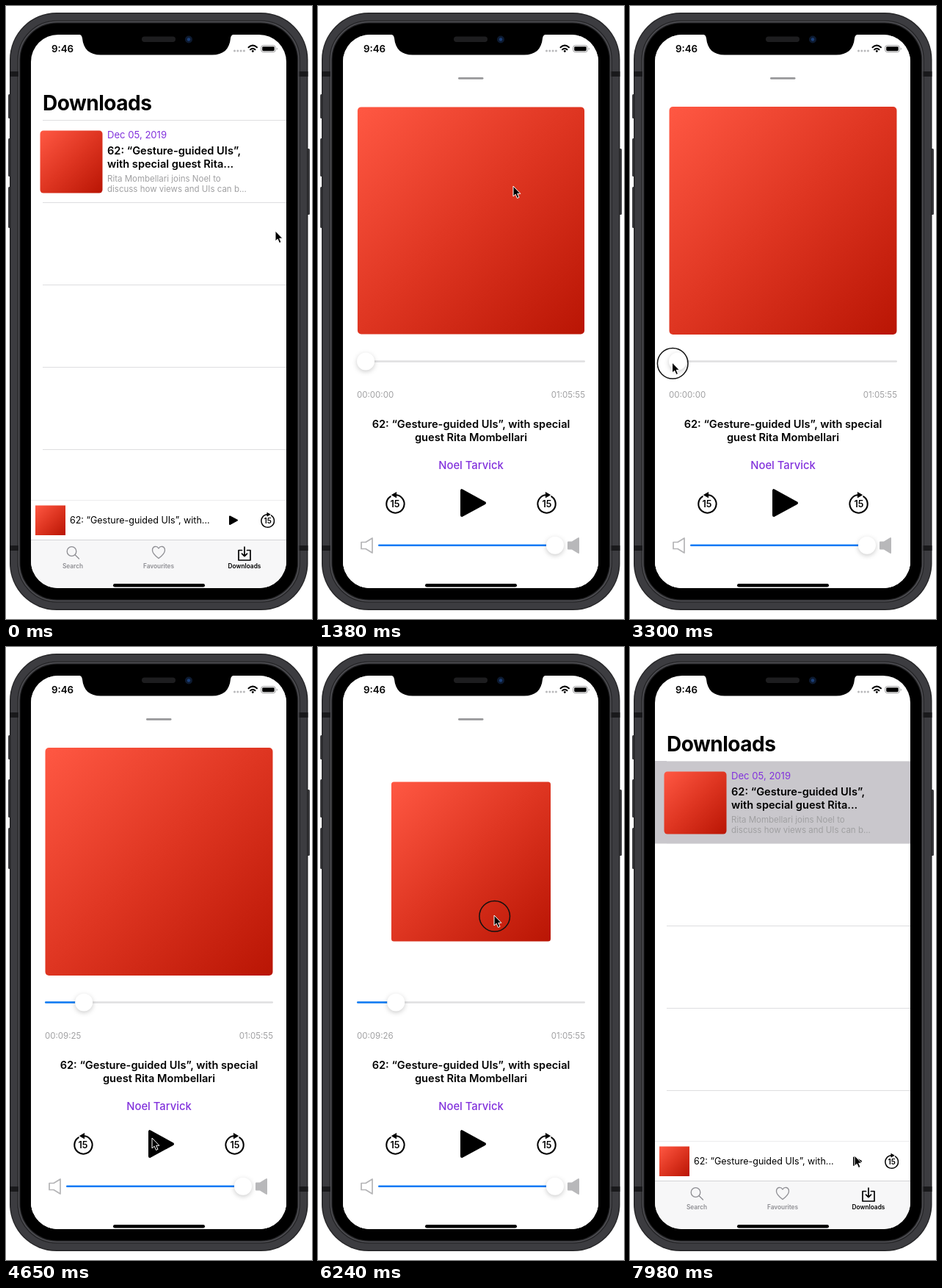
An HTML page that plays this animation: 417x834 px, repeating every 8 s.

```html
<!DOCTYPE html>
<html lang="en">
<head>
<meta charset="utf-8">
<title>Podcast player</title>
<style>
  html, body { margin: 0; width: 100%; height: 100%; overflow: hidden; background: #fff; }
  svg { display: block; width: 100vw; height: 100vh; font-family: Inter, Roboto, sans-serif; }
  .h1 { font-size: 28px; font-weight: 700; letter-spacing: -.5px; }
  .head { font-size: 14.6px; font-weight: 600; }
  .date { font-size: 13.1px; }
  .small { font-size: 11.5px; fill: #a0a0a2; }
  .mini { font-size: 12.5px; }
  .tab { font-size: 8.3px; font-weight: 600; }
  .purple { fill: #8232dc; }
  .mid { text-anchor: middle; }
  .end { text-anchor: end; }
  .line { fill: none; stroke-linecap: round; stroke-linejoin: round; }
  .knob { fill: #fff; filter: drop-shadow(0 2px 3px #0003); }
</style>
</head>
<body>
<svg viewBox="0 0 417 834">
  <defs>
    <linearGradient id="red" x1="0" y1="0" x2="1" y2="1">
      <stop offset="0" stop-color="#ff5843"/><stop offset=".5" stop-color="#de3521"/><stop offset="1" stop-color="#b91504"/>
    </linearGradient>
    <clipPath id="screen"><rect x="34" y="39" width="348" height="753" rx="37"/></clipPath>
    <g id="skip">
      <path class="line" stroke="#000" stroke-width="2" d="M6-9.800A11.700 11.700 0 1 1 0-11.700"/>
      <path d="M-2-15.800 5-11.700-2-7.600Z"/>
    </g>
  </defs>

  <g id="phone">
    <g fill="#38383b">
      <rect x="3" y="120" width="6" height="33" rx="1.500"/>
      <rect x="3" y="180" width="6" height="52" rx="1.500"/>
      <rect x="3" y="246" width="6" height="56" rx="1.500"/>
      <rect x="408" y="194" width="6" height="90" rx="1.500"/>
    </g>
    <rect x="5" y="9" width="406.500" height="813" rx="64" fill="#252527"/>
    <rect x="11" y="15" width="394.500" height="801" rx="58" fill="none" stroke="#3c3c40" stroke-width="9"/>
    <rect x="17.500" y="21.500" width="381.500" height="788" rx="52" fill="none" stroke="#505055" stroke-width="1.500"/>
    <path fill="#19191b" d="M5 89h12v7H5zM399.500 89h12v7h-12zM5 734h12v7H5zM399.500 734h12v7h-12z"/>
    <rect x="19.500" y="23.500" width="377.500" height="784" rx="50"/>
    <rect x="34" y="39" width="348" height="753" rx="37" fill="#fff"/>
  </g>

  <g clip-path="url(#screen)">
    <g id="list">
      <text class="h1" x="50" y="142">Downloads</text>
      <rect id="cell" x="34" y="155" width="348" height="112.500" fill="#c9c7cc"/>
      <path id="rules" stroke="#dedee0"/>
      <rect x="46.500" y="169.500" width="85" height="85" rx="4.500" fill="url(#red)"/>
      <text class="date purple" x="138" y="180">Dec 05, 2019</text>
      <text class="head" x="138" y="202">62: “Gesture-guided UIs”,</text>
      <text class="head" x="138" y="220">with special guest Rita...</text>
      <text class="small" x="138" y="239">Rita Mombellari joins Noel to</text>
      <text class="small" x="138" y="253">discuss how views and UIs can b...</text>

      <path d="M34 672.500H382" stroke="#ececee"/>
      <rect x="40" y="679.500" width="41" height="40.500" fill="url(#red)"/>
      <text class="mini" x="87" y="704">62: “Gesture-guided UIs”, with...</text>
      <path class="line" style="fill:#000" stroke="#000" stroke-width="2" d="M305 694.500V705L315 699.700Z"/>
      <use href="#skip" transform="translate(357 700.500) scale(.75)"/>
      <text class="mid" x="356.800" y="704.400" font-size="10" font-weight="600">15</text>

      <rect x="34" y="726" width="348" height="66" fill="#f7f7f8"/>
      <path d="M34 726.500H382" stroke="#d4d4d6"/>
      <g class="line" stroke="#8e8e93" stroke-width="1.300">
        <circle cx="89.500" cy="742" r="6.300"/><path d="M94.200 746.700 99.500 752"/>
        <path d="M208 751.500C202 747 199.500 744 199.500 740.500C199.500 735 205.500 733.500 208 738C210.500 733.500 216.500 735 216.500 740.500C216.500 744 214 747 208 751.500Z"/>
        <path stroke="#000" stroke-width="1.700" d="M321.500 740.500H317V754H333V740.500H328.500M325 736V748.500M321.500 745.200 325 748.700 328.500 745.200"/>
      </g>
      <g class="tab mid" fill="#8e8e93">
        <text x="91" y="765">Search</text>
        <text x="208" y="765">Favourites</text>
        <text x="325" y="765" fill="#000">Downloads</text>
      </g>
    </g>

    <g id="sheet">
      <rect x="34" y="39" width="348" height="830" fill="#fff"/>
      <rect x="191" y="97" width="34.500" height="2.800" rx="1.400" fill="#98989a"/>
      <rect id="cover" x="-155" y="-155" width="310" height="310" rx="5" fill="url(#red)"/>

      <rect x="53" y="482.300" width="311" height="2.500" rx="1.200" fill="#dfdfe1"/>
      <rect id="played" x="53" y="482.300" height="2.500" rx="1.200" fill="#0a7af5"/>
      <circle id="knob" class="knob" cy="483.500" r="12"/>
      <text id="elapsed" class="small" x="53" y="532.600"></text>
      <text class="small end" x="364" y="532.600">01:05:55</text>

      <g class="mid">
        <text class="head" x="208.500" y="574">62: “Gesture-guided UIs”, with special</text>
        <text class="head" x="208.500" y="592">guest Rita Mombellari</text>
        <text class="purple" x="208.500" y="630" font-size="14.800" font-weight="500">Noel Tarvick</text>
        <g font-size="12.500" font-weight="600">
          <text x="105" y="682">15</text><text x="312" y="682">15</text>
        </g>
      </g>
      <use href="#skip" transform="translate(105 677.500) scale(-1.040 1.040)"/>
      <use href="#skip" transform="translate(312 677.500) scale(1.040)"/>
      <path id="play" class="line" style="fill:#000" stroke="#000" stroke-width="4" d="M196 659.200V693L227 676.200Z"/>
      <path id="pause" d="M196 659h9v35h-9zM215 659h9v35h-9z"/>

      <path class="line" stroke="#b4b4b6" stroke-width="1.700" d="M59 729.500H65L74 724V744L65 738.500H59Z"/>
      <path class="line" style="fill:#b8b8ba" stroke="#b8b8ba" stroke-width="2" d="M341 729.500H346L355 724V744L346 738.500H341Z"/>
      <rect x="82" y="732.500" width="241" height="2.500" rx="1.200" fill="#0a7af5"/>
      <circle class="knob" cx="323" cy="733.700" r="12"/>
    </g>
    <rect x="146" y="786" width="125" height="4.500" rx="2.200"/>
  </g>

  <g id="status">
    <path d="M98 38H312C307.500 39 306.500 41 306 44C304.500 59 296 66.500 281 66.500H129C114 66.500 105.500 59 104 44C103.500 41 102.500 39 98 38Z"/>
    <rect x="185" y="41.500" width="46" height="7.500" rx="3.700" fill="#1d1d1f"/>
    <circle cx="249" cy="45.500" r="5" fill="#0d1a30"/><circle cx="249" cy="45.500" r="2.200" fill="#1b3f78"/>
    <text x="62" y="63" font-size="13.300" font-weight="600">9:46</text>
    <path class="line" stroke="#b9b9bb" stroke-width="3" stroke-dasharray="0 4.300" d="M311.500 61H326"/>
    <path class="line" stroke="#000" stroke-width="2" d="M330.500 56.300Q336.300 51 342 56.300M333 59.300Q336.300 56.500 339.500 59.300"/>
    <circle cx="336.300" cy="61.500" r="1.400"/>
    <rect x="347.700" y="53.700" width="19.500" height="9" rx="2.800" fill="none" stroke="#9a9a9c"/>
    <rect x="349.200" y="55.200" width="16.500" height="6" rx="1.400"/>
    <path d="M368.800 56.500Q371 58.200 368.800 60Z" fill="#9a9a9c"/>
  </g>

  <g id="cursor">
    <circle id="press" cx=".7" cy="1.300" r="20.800" fill="none" stroke="#111" stroke-width="1.500"/>
    <path stroke="#fff" stroke-width="1" d="M0 0V14L3.200 11.200 5.500 16.500 8 15.400 5.700 10.300H9.900Z"/>
  </g>
</svg>
<script>
const LOOP = 8000, HIDDEN = 760;
const SHEET_IN = 479, GROW = 880, SHRINK = 5430, DRAG = 6490, RELEASE = 6900;
const $ = id => document.getElementById(id);
const show = (id, on) => $(id).style.display = on ? '' : 'none';
const move = (id, x, y, s = 1) => $(id).setAttribute('transform', `translate(${x} ${y}) scale(${s})`);

// time, x, y of the pointer tip
const path = [
  [0, 367, 306], [100, 367, 306], [400, 266, 245], [1550, 266, 245], [2300, 205, 717],
  [2520, 205, 714], [3200, 57.5, 485], [3400, 57.5, 485], [4020, 98, 486], [4080, 98, 486],
  [4550, 199, 668], [4660, 199, 668], [4760, 203, 682], [5340, 203, 685], [5440, 203, 685],
  [6150, 240, 365], [DRAG, 240, 365], [RELEASE, 243, 610], [7350, 243, 610], [7900, 306, 692]
];
const presses = [[400, 510], [3240, 4040], [4750, 4840], [5330, 5430], [6200, RELEASE]];

const clamp = v => Math.max(0, Math.min(1, v));
const smooth = u => u * u * (3 - 2 * u);
const within = (t, a, b) => t >= a && t < b;

function pointer(t) {
  const i = path.findIndex(p => p[0] > t);
  if (i < 0) return path.at(-1).slice(1);
  const [t0, x0, y0] = path[i - 1], [t1, x1, y1] = path[i];
  const u = smooth((t - t0) / (t1 - t0));
  return [x0 + (x1 - x0) * u, y0 + (y1 - y0) * u];
}

// Remaining distance of a damped spring, 1 down to 0; rate is in rad/s.
function spring(ms, rate, damping) {
  if (ms <= 0) return 1;
  const a = rate * ms / 1000, k = damping / Math.sqrt(1 - damping * damping);
  return Math.exp(-k * a) * (Math.cos(a) + k * Math.sin(a));
}

function sheetOffset(t, y) {
  if (t < DRAG) return HIDDEN * spring(t - SHEET_IN, 12.5, .69);
  if (t < RELEASE) return y - 365;
  const u = clamp((t - RELEASE) / 300);
  return 245 + (HIDDEN - 245) * (1 - (1 - u) ** 2);
}

function coverScale(t) {
  return t < SHRINK ? 1 - .3 * spring(t - GROW, 15.5, .48) : .7 + .3 * spring(t - SHRINK, 15.5, .48);
}

function clock(s) {
  return [s / 3600, s / 60 % 60, s % 60].map(n => String(Math.floor(n)).padStart(2, '0')).join(':');
}

function draw(t) {
  const [x, y] = pointer(t);
  move('cursor', x, y);
  show('press', presses.some(([a, b]) => within(t, a, b)));
  show('cell', t > 420);

  move('sheet', 0, sheetOffset(t, y));
  move('cover', 208.5, 292, coverScale(t));

  const seconds = Math.floor(565 * smooth(clamp((t - 3400) / 620))) + (t > 5250 ? 1 : 0);
  const knob = 65 + 288 * seconds / 3955;
  $('knob').setAttribute('cx', knob);
  $('played').setAttribute('width', seconds ? knob - 53 : 0);
  $('elapsed').textContent = clock(seconds);

  const playing = within(t, 4840, SHRINK);
  show('play', !playing);
  show('pause', playing);
}

$('rules').setAttribute('d', [0, 1, 2, 3, 4].map(i => `M50 ${155.5 + 112 * i}H382`).join(''));
const start = performance.now();
function tick() {
  draw((performance.now() - start) % LOOP);
  requestAnimationFrame(tick);
}
tick();
</script>
</body>
</html>
```
